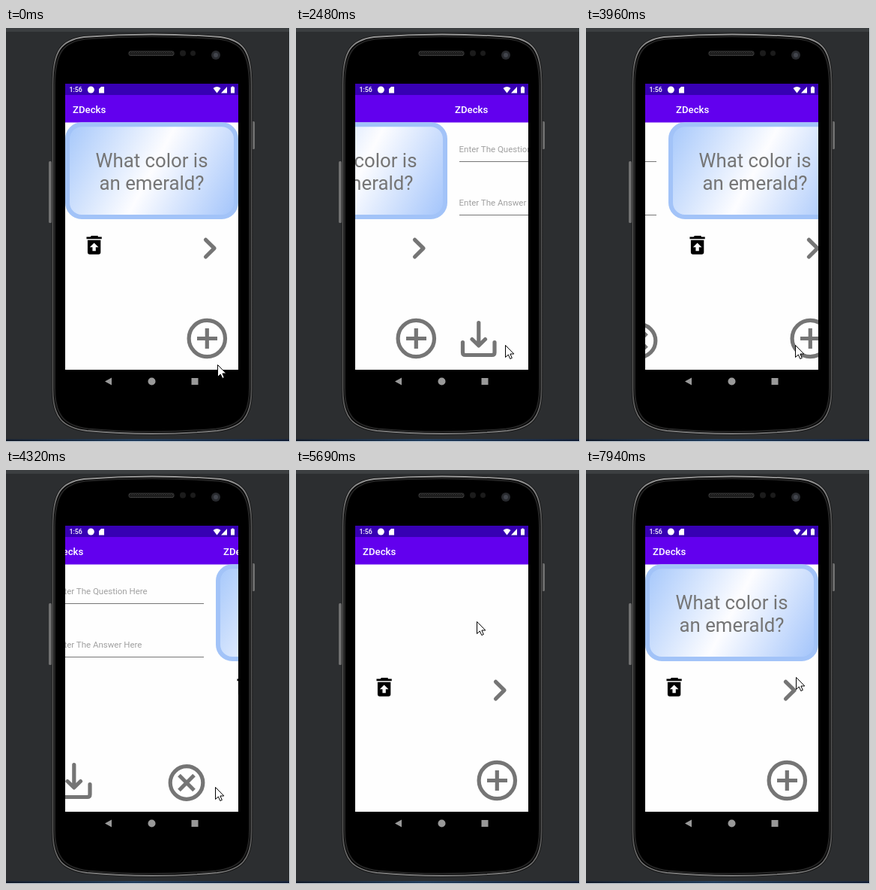
These frames come from a looping animation (379x550 px, 8 s). An HTML page:

```html
<!DOCTYPE html>
<html lang="en">
<head>
<meta charset="utf-8">
<title>Flash cards</title>
<style>
  html, body { margin: 0; width: 100%; height: 100%; overflow: hidden; background: #2c2e30; }
  svg { display: block; width: 100%; height: 100%; font-family: Roboto, sans-serif; }
  .icon { fill: none; stroke: #757575; stroke-width: 5.2; }
  .round { stroke-linecap: round; stroke-linejoin: round; }
  .title { font-size: 13.2px; font-weight: 500; fill: #fff; }
  .card-text { font-size: 25.8px; fill: #757575; text-anchor: middle; }
  .hint { font-size: 11.5px; fill: #a0a0a0; }
</style>
</head>
<body>
<svg viewBox="0 0 379 550">
  <defs>
    <linearGradient id="shine" gradientUnits="userSpaceOnUse" x1="85" y1="131" x2="304" y2="248">
      <stop offset="0" stop-color="#a8c9fb"/>
      <stop offset=".5" stop-color="#fdfdff"/>
      <stop offset="1" stop-color="#a4c5fb"/>
    </linearGradient>
    <linearGradient id="metal" x1="0" x2="0" y1="0" y2="1">
      <stop offset="0" stop-color="#999"/>
      <stop offset=".1" stop-color="#555"/>
      <stop offset=".9" stop-color="#555"/>
      <stop offset="1" stop-color="#777"/>
    </linearGradient>
    <linearGradient id="taskbar">
      <stop offset="0" stop-color="#17202e"/>
      <stop offset=".45" stop-color="#24405f"/>
      <stop offset="1" stop-color="#17233a"/>
    </linearGradient>
    <pattern id="mesh" width="3" height="3" patternUnits="userSpaceOnUse">
      <rect width="3" height="3" fill="#111"/>
      <path d="M0 0L3 3M3 0L0 3" stroke="#333" stroke-width=".7"/>
    </pattern>
    <clipPath id="screen"><rect x="79" y="89" width="231" height="365"/></clipPath>
    <clipPath id="reveal"><circle id="circle" cx="310" cy="169" r="999"/></clipPath>
    <path id="body" d="M62.500 75C62.500 30 74 16 104 12Q195 5 286 12C316 16 327.500 30 327.500 75V480C327.500 518 314 531 282 535Q195 543 108 535C76 531 62.500 518 62.500 480Z"/>
  </defs>

  <!-- Desktop and phone -->
  <rect width="379" height="550" fill="#2c2e30"/>
  <rect width="379" height="5" fill="#3c3f41"/>
  <rect y="546" width="379" height="3" fill="url(#taskbar)"/>
  <path d="M378.500 0V549.500H0" fill="none" stroke="#dde3e8"/>
  <rect x="57" y="177" width="4" height="82" rx="1.500" fill="#707070"/>
  <rect x="328" y="124" width="4" height="37" rx="1.500" fill="#707070"/>
  <use href="#body" stroke="#151515" stroke-width="3.500"/>
  <use href="#body" stroke="url(#metal)" stroke-width="1.800"/>
  <use href="#body" fill="none" stroke="#242424" stroke-width="2" transform="translate(195 274) scale(.981 .990) translate(-195 -274)"/>
  <rect x="164" y="31" width="60" height="5.500" rx="2" fill="url(#mesh)" stroke="#3c3c3c"/>
  <g fill="#1b1b1b">
    <circle cx="236" cy="33.500" r="4"/><circle cx="249.500" cy="33.500" r="3.500"/>
    <circle cx="280" cy="36" r="6" fill="#282a2e"/><circle cx="280" cy="36" r="3" fill="#42464d"/>
  </g>

  <!-- System bars -->
  <rect x="79" y="74" width="231" height="15" fill="#3700b3"/>
  <rect x="79" y="125" width="231" height="329" fill="#fefefe"/>
  <rect x="79" y="89" width="231" height="36.500" fill="#6200ee"/>
  <g fill="#fff">
    <text x="84.500" y="85" font-size="8.800" font-weight="500">1:56</text>
    <circle cx="113.300" cy="82" r="4.500"/>
    <path d="M127 78H131V86.500H124V81Z"/>
    <path d="M276.500 80Q281.500 76 286.500 80L281.500 86.500ZM295 78V86.500H287ZM300 78.500H301.500V77.500H303.500V78.500H305V86.500H300Z"/>
  </g>
  <g fill="#999">
    <path d="M141 464.500V474.500L132 469.500Z"/>
    <circle cx="194.500" cy="469.500" r="5"/>
    <rect x="247.500" y="465" width="9" height="9"/>
  </g>

  <!-- Pages -->
  <g clip-path="url(#screen)">
    <g id="cards">
      <text class="title" x="89" y="112.500">ZDecks</text>
      <g clip-path="url(#reveal)">
        <rect x="82" y="128.300" width="225" height="122.700" rx="19" fill="url(#shine)" stroke="#a2c3f8" stroke-width="6"/>
        <g id="question" class="card-text">
          <text x="194.500" y="185">What color is</text>
          <text x="194.500" y="215">an emerald?</text>
        </g>
        <text id="answer" class="card-text" x="194.500" y="200">Green</text>
      </g>
      <path transform="translate(100.200 270.200) scale(1.450)" fill-rule="evenodd"
            d="M15.500 4L14.500 4H9.500L8.500 5H5V7H19V5H15.500ZM6 8H18V19Q18 21 16 21H8Q6 21 6 19ZM12 10.500L8 14.500H10.500V18H13.500V14.500H16Z"/>
      <path class="icon round" d="M266.500 281.300L278 292.700L266.500 304"/>
      <g class="icon">
        <circle cx="268.300" cy="412.500" r="24.200"/>
        <path d="M255 412.500H282M268.300 399V426"/>
      </g>
    </g>
    <g id="form">
      <text class="title" x="89" y="112.500">ZDecks</text>
      <text class="hint" x="94.500" y="165">Enter The Question Here</text>
      <text class="hint" x="94.500" y="235.500">Enter The Answer Here</text>
      <path d="M95 177.500H294M95 248.500H294" stroke="#777"/>
      <path class="icon round" d="M99.500 417.500V431Q99.500 434.500 103 434.500H138.500Q142 434.500 142 431V417.500M120.800 391.500V421M112 413.500L120.800 422L129.500 413.500"/>
      <g class="icon">
        <circle cx="271" cy="415.500" r="21.800"/>
        <path d="M261 405.500L281 425.500M281 405.500L261 425.500"/>
      </g>
    </g>
  </g>

  <path id="cursor" d="M.500 .500V16.500L4.300 13L6.800 18.500L9.300 17.400L6.900 12H11.800Z" fill="#fff" stroke="#000"/>
</svg>
<script>
const LOOP = 8000;
const PAGE = 231;
const SLIDE_MS = 489;
const REVEAL_MS = 800;
const REVEAL_RADIUS = Math.hypot(PAGE, 44);

const slideTicks = [2330, 2480, 2630, 2760, 3960, 4080, 4200, 4320, 4470];
const revealTicks = [5690, 5810, 5960, 6110, 6260, 6410, 6560];
const ticks = [0, ...slideTicks, ...revealTicks, 7520];

// Time, x, y of the pointer tip
const pointer = [
  [0, 282, 447], [120, 274, 440], [270, 274, 438], [390, 274, 436],
  [540, 275, 429], [850, 291, 432], [1000, 308, 453], [1420, 299, 437],
  [1570, 294, 430], [1720, 284, 424], [1870, 279, 421], [4470, 274, 394],
  [4620, 254, 270], [4750, 241, 201], [7670, 254, 234], [7820, 269, 258],
  [7940, 280, 275]
];

const el = id => document.getElementById(id);
const clamp = v => Math.min(1, Math.max(0, v));
const move = (id, x, y = 0) => el(id).setAttribute("transform", `translate(${x} ${y})`);
const show = (id, on) => el(id).setAttribute("visibility", on ? "visible" : "hidden");

function pageOffsets(t) {
  if (t < 3960) {
    const x = -Math.round(PAGE * clamp((t - 2252) / SLIDE_MS));
    return [x, x + PAGE];
  }
  // Closing slides the form back in from the left, then snaps to the cards.
  if (t < 4470) {
    const x = Math.round(PAGE * clamp((t - 3894) / SLIDE_MS));
    return [x, x - PAGE];
  }
  return [0, PAGE];
}

function revealRadius(t) {
  if (t < 5690 || t >= 6560) return 999;
  const p = clamp((t - 5680) / REVEAL_MS);
  return REVEAL_RADIUS * (1 - Math.cos(Math.PI * p)) / 2;
}

function draw(time) {
  const t = time % LOOP;
  const held = ticks.findLast(tick => tick <= t);
  const [, x, y] = pointer.findLast(([at]) => at <= t);
  const [cardsX, formX] = pageOffsets(held);
  const answered = held >= 5690 && held < 7520;

  move("cards", cardsX);
  move("form", formX);
  move("cursor", x, y);
  el("circle").setAttribute("r", revealRadius(held));
  show("question", !answered);
  show("answer", answered);
}

const start = performance.now();
function loop() {
  draw(performance.now() - start);
  requestAnimationFrame(loop);
}
loop();
</script>
</body>
</html>
```
